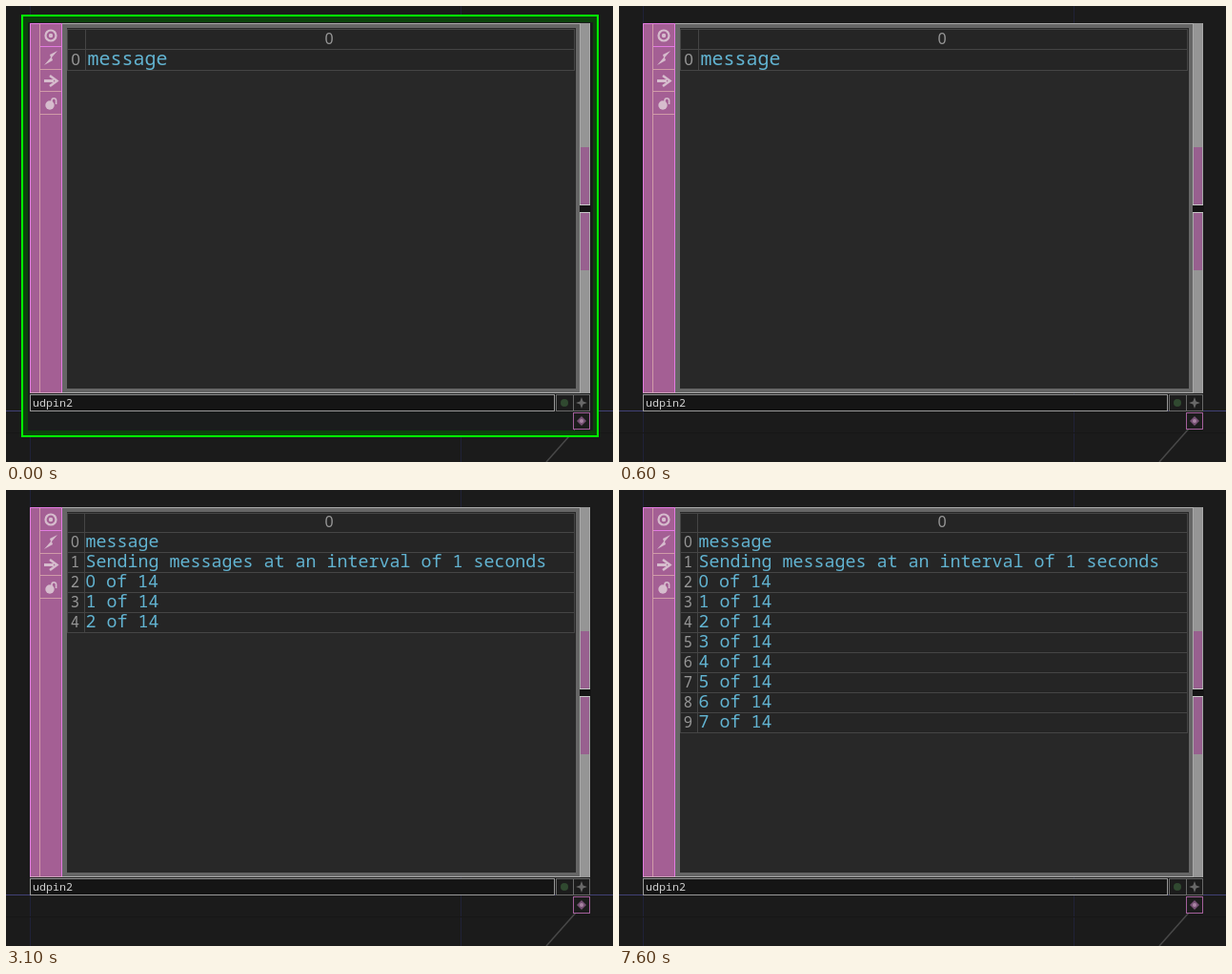
Animation, 637 px wide and 478 px high, one loop 8000 ms. Source, as an HTML page:

```html
<!DOCTYPE html>
<html lang="en">
<head>
<meta charset="utf-8">
<title>udpin2</title>
<style>
html, body { margin: 0; height: 100%; overflow: hidden; background: #1b1b1b; }
svg { display: block; }
text { font-family: "Noto Sans Mono", "DejaVu Sans Mono", monospace; }
.zero { font-family: "Noto Sans", sans-serif; }
.index { fill: #979797; text-anchor: middle; font-weight: 500; }
.cell { fill: #62b4d2; }
</style>
</head>
<body>
<svg width="637" height="478" viewBox="0 0 637 478">
  <rect width="637" height="478" fill="#1b1b1b"/>
  <path d="M25.5 0V478M477.5 0V478" stroke="#202238"/>
  <path d="M0 447.5H637" stroke="#171717"/>
  <path d="M0 424.5H637" stroke="#414176"/>
  <path d="M598 443L567 478" stroke="#484848" stroke-width="1.5"/>

  <g id="selected">
    <rect x="17" y="10" width="604" height="441" fill="#0b420b" stroke="#0f0" stroke-width="2"/>
    <rect x="23" y="17" width="593" height="428" fill="#1a1c1c"/>
    <path d="M598 443L596 445" stroke="#484848"/>
  </g>
  <g id="hover">
    <rect x="23" y="16" width="592" height="411" fill="#303030" stroke="#777" stroke-width="1.6"/>
  </g>

  <!-- panel and table area -->
  <rect x="25" y="18" width="588" height="388" fill="#666"/>
  <path d="M25 18.5H613M59 405.5H613" stroke="#aaa"/>
  <rect x="64" y="23" width="534" height="378" fill="#282828"/>

  <!-- scroll bar -->
  <rect x="602" y="18" width="11" height="388" fill="#959595"/>
  <path d="M602.5 18V406M612.5 18V406" stroke="#a8a8a8"/>
  <path d="M603 148h9v61h-9zM603 217h9v60h-9z" fill="#98608f"/>
  <rect x="602" y="209" width="12" height="7" fill="#141414"/>
  <path d="M602 208.5h11M602 216.5h11" stroke="#c8c8c8"/>

  <!-- flag strip -->
  <rect x="25" y="18" width="34" height="388" fill="#a45f94"/>
  <path d="M35.5 18V405M36 66.5H59M36 89.5H59M36 113.5H59" stroke="#d09ba8"/>
  <path d="M25.5 405V18.5H58.5V405M36 42.5H59" fill="none" stroke="#e27be0"/>
  <path d="M25 405.5H59" stroke="#c9a0b8"/>
  <g fill="#d6bccd" stroke="#d6bccd">
    <circle cx="47" cy="31" r="5.5" fill="none" stroke-width="2.2"/>
    <circle cx="47" cy="31" r="2.2" stroke="none"/>
    <path d="M54 47L46 51L47 54L40 62L49 57L48 54Z" stroke="none"/>
    <path d="M40 78.5H50" stroke-width="3"/>
    <path d="M46 73L53.5 78.5L46 84" fill="none" stroke-width="2.5"/>
    <circle cx="46" cy="104" r="4.7" stroke="none"/>
    <path d="M48 101V99a2.3 2.3 0 0 1 4.6 0V103" fill="none" stroke-width="1.6"/>
  </g>

  <!-- name bar -->
  <rect x="25.5" y="407.5" width="550" height="17" fill="#151515" stroke="#999"/>
  <text x="28" y="420" font-size="11.67" fill="#d0d0d0">udpin2</text>
  <g fill="#1c1c1c" stroke="#686868">
    <rect x="577.5" y="407.5" width="18" height="17"/>
    <rect x="595.5" y="407.5" width="17" height="17"/>
    <rect x="595.5" y="426.5" width="17" height="17" stroke="#a4609c"/>
  </g>
  <circle cx="586" cy="416" r="4" fill="#304930"/>
  <path d="M604 410l1.6 4.4L610 416l-4.4 1.6L604 422l-1.6-4.4L598 416l4.4-1.6z" fill="#686868"/>
  <path d="M604 430l5 5-5 5-5-5z" fill="#765174"/>
  <circle cx="604" cy="435" r="2" fill="#a985a3"/>

  <g id="table"></g>
</svg>
<script>
const LOOP = 8000;
const FIRST = 1200;
const COUNT_TIMES = [1200, 2100, 3100, 4000, 4900, 5800, 6700, 7600];
const byId = id => document.getElementById(id);

// The digit zero is plain, so it comes from the proportional face.
const label = (cls, x, y, size, value) =>
  `<text class="${cls}" x="${x}" y="${y}" font-size="${size}">` +
  String(value).replace(/0/g, '<tspan class="zero">0</tspan>') + '</text>';

function table(rows, large) {
  const pitch = large ? 22 : 21;
  const top = large ? 45.5 : 44.5;
  const split = large ? 83.5 : 82.5;
  const bottom = top + rows.length * pitch;
  let lines = `M64.5 24V${bottom}M${split} 24V${bottom}M596.5 24V${bottom}M64 24.5H597M64 ${top}H597`;
  let text = label('index', 339, large ? 39.5 : 39, 16, 0);
  rows.forEach((row, i) => {
    lines += `M64 ${top + (i + 1) * pitch}H597`;
    const base = (large ? 61.5 : 60) + i * pitch;
    text += label('index', large ? 73 : 72.5, base, large ? 17 : 15.5, i);
    text += label('cell', large ? 85.5 : 83.5, base, large ? 20 : 18.33, row);
  });
  return `<rect x="64" y="24" width="533" height="${bottom - 24}" fill="#252525"/>` +
    `<path d="${lines}" fill="none" stroke="#454545"/>` + text;
}

let shown = -1;
function draw(now) {
  const t = now % LOOP;
  const count = COUNT_TIMES.filter(start => t >= start).length;
  const show = (id, on) => byId(id).setAttribute('visibility', on ? 'visible' : 'hidden');
  show('selected', t < 100 || (t >= 200 && t < 600));
  show('hover', t >= 2700 && t < 2900);
  if (count !== shown) {
    shown = count;
    const rows = ['message'];
    if (t >= FIRST) rows.push('Sending messages at an interval of 1 seconds');
    for (let i = 0; i < count; i++) rows.push(`${i} of 14`);
    byId('table').innerHTML = table(rows, t < FIRST);
  }
  requestAnimationFrame(draw);
}
draw(0);
</script>
</body>
</html>
```
